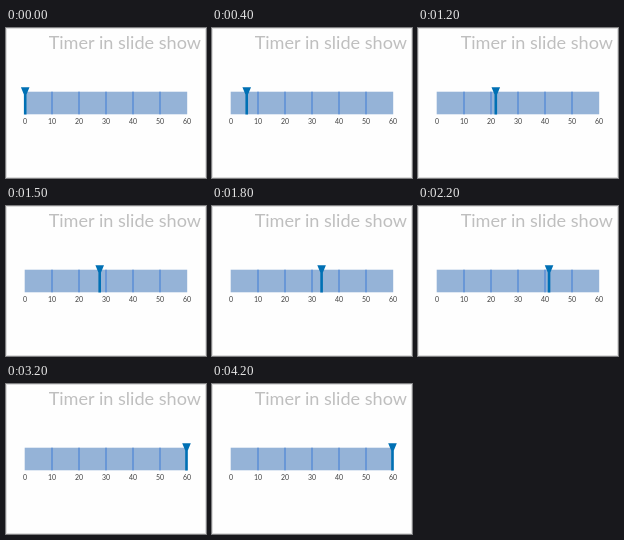
Recreate the animation shown at these times as an HTML page. Size 200x150 px, loop 5200 ms.

```html
<!DOCTYPE html>
<html lang="en">
<head>
<meta charset="utf-8">
<title>Timer</title>
<style>
  html, body { margin: 0; width: 100%; height: 100%; overflow: hidden; background: #fefefe; }
  svg { display: block; width: 100vw; height: 100vh; }
  text { font-family: Lato, "Open Sans", sans-serif; }
</style>
</head>
<body>
<svg viewBox="0 0 200 150">
  <rect width="200" height="150" fill="#fefefe"/>
  <rect x=".5" y=".5" width="199" height="149" fill="none" stroke="#dcdcdc"/>
  <text x="195" y="21" font-size="18.1" text-anchor="end" fill="#bfbfbf">Timer in slide show</text>
  <rect x="18.7" y="63.7" width="162.5" height="22.6" fill="#95b3d7"/>
  <g id="scale"></g>
  <g id="marker" fill="#0070b4">
    <path d="M-4.3 59.2H4.3L1.3 66.5V86.5H-1.3V66.5Z"/>
  </g>
</svg>
<script>
const LOOP = 5200, STEP = 100;
const scale = document.getElementById('scale');
const marker = document.getElementById('marker');
const path = [[0, 19.2], [100, 19.8], [800, 54.6], [1200, 77.8], [1800, 109.6],
              [2600, 152.5], [3100, 178.8], [3200, 180.5]];

function add(tag, attrs, label = '') {
  const el = document.createElementNS('http://www.w3.org/2000/svg', tag);
  for (const key in attrs) el.setAttribute(key, attrs[key]);
  el.textContent = label;
  scale.append(el);
}

for (let i = 0; i <= 6; i++) {
  const x = 19 + 27 * i;
  if (i > 0 && i < 6) add('rect', { x: x - 0.75, y: 63.7, width: 1.5, height: 22.6, fill: '#5b8fd6' });
  add('text', { x, y: 95.6, 'font-size': 7, 'text-anchor': 'middle', fill: '#404040' }, i * 10);
}

function position(t) {
  const i = path.findIndex(p => p[0] > t);
  if (i < 0) return path[path.length - 1][1];
  const [t0, x0] = path[i - 1], [t1, x1] = path[i];
  return x0 + (x1 - x0) * (t - t0) / (t1 - t0);
}

function draw(time) {
  const t = Math.floor(time % LOOP / STEP) * STEP;
  marker.setAttribute('transform', `translate(${position(t)} 0)`);
}

const start = performance.now();
function tick() {
  draw(performance.now() - start);
  requestAnimationFrame(tick);
}
tick();
</script>
</body>
</html>
```
